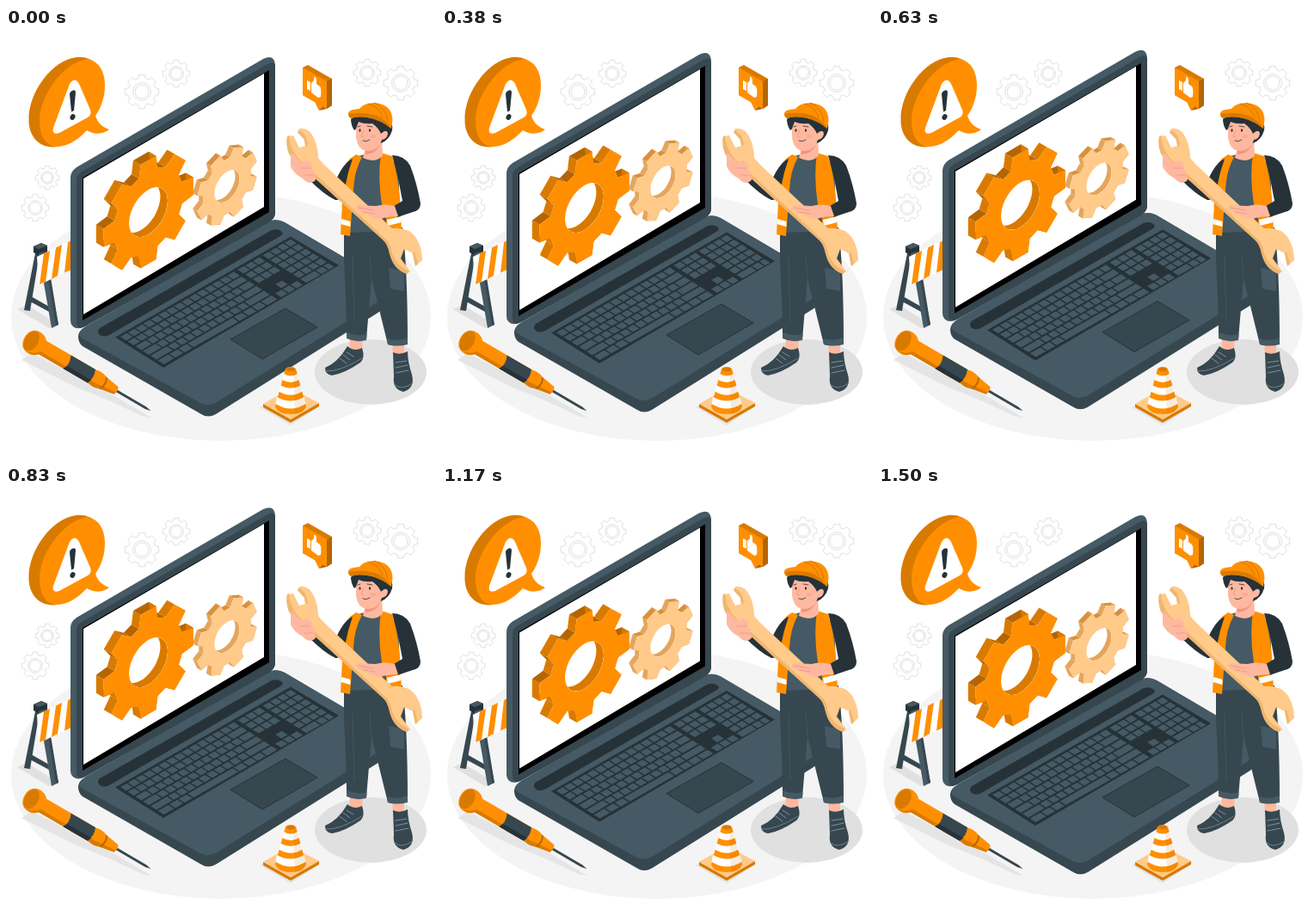
Recreate the animation shown at these times as an HTML page. Size 500 px wide and 500 px high, loop 1540 ms.

```html
<!DOCTYPE html>
<html lang="en">
<head>
<meta charset="utf-8">
<title>Maintenance</title>
<style>
html, body { margin: 0; width: 100%; height: 100%; overflow: hidden; background: #fff; }
svg { display: block; width: 100%; height: 100%; }
.o { fill: #ff8f00; } .od { fill: #d97a00; } .ob { fill: #b56500; }
.g { fill: #455a64; } .gm { fill: #37474f; } .gd { fill: #263238; }
.w { fill: #fff; } .s { fill: #ffb8a0; } .sd { fill: #ee9580; }
.y { fill: #ffca8a; } .yd { fill: #f0b56f; } .sh { fill: #e0e0e0; }
.l { fill: none; stroke-width: .8; stroke-linecap: round; }
</style>
</head>
<body>
<svg viewBox="0 0 500 500" xmlns="http://www.w3.org/2000/svg">
<ellipse cx="250" cy="335.500" rx="244" ry="144.500" fill="#f4f4f4"/>
<g id="cogs" fill="none" stroke="#e0e0e0" stroke-width="1"></g>

<!-- warning bubble -->
<path class="od" d="M26.500 106C26 76 53 37 82 34Q91 33 99 37L104 100L60 138C41 141 26 128 26.500 106Z"/>
<path class="o" d="M39 108C39 79 66 40 95 36C109 39 115 52 115 66C115 80 111 92 104 102C107 111 112 115 120 118C113 124 102 124 94 119C83 131 71 138 58 138C46 137 39 125 39 108Z"/>
<path class="w" d="M74 65Q80 56 85 65L98 95Q100 101 95 104L62 122Q53 125 55 116Z"/>
<path class="gd" d="M74 77Q74 74 78 72.500Q81 71.500 81 75L79 96L76 97.500Z"/>
<ellipse class="gd" cx="77.500" cy="103.500" rx="2.800" ry="3.600" transform="rotate(25 77.500 103.500)"/>

<!-- like tag -->
<path class="od" d="M345 46L351 43L379 59V90L373 94L345 78Z"/>
<path class="o" d="M345 46L373 62V94L368 91L364 96L359 86L345 78Z"/>
<path class="ob" d="M373 62L379 59V90L373 94L364 96L368 91L373 94Z"/>
<path class="w" d="M350 61L354 63V73L350 71ZM355 64L358 61V57Q360 56 361 60V65L365 68Q367 70 366 80L363 81L355 75Z"/>

<!-- barrier -->
<path class="sh" d="M13 327L24 322L60 344L50 349Z"/>
<path class="gm" d="M34 262L39 262L28 329L21 328ZM29 312L52 325V331L28 318Z"/>
<path class="gd" d="M32 254L41 250L48 253V261L38 264L32 261Z"/>
<path class="g" d="M32 254L41 250L48 253L38 257Z"/>
<path class="g" d="M38 262L44 260L61 345L53 349Z"/>
<path class="gm" d="M44 260L47 260L61 345L58 346Z"/>
<path class="w" d="M36 266L78 246V280L38 299Z"/>
<path class="o" d="M44 262L51 259L46 295L39 298ZM58 255.500L65 252L60 288L53 292ZM72 249L78 246V280L68 284.500Z"/>

<!-- screwdriver -->
<path class="sh" d="M18 386L30 378L130 430L169 453L160 452L122 434L80 417Z" opacity=".75"/>
<g transform="translate(33 366) rotate(30.300)">
  <path d="M108-1.300H150L157 0L150 1.600H108Z" fill="#37474f"/>
  <path class="o" d="M-13 0C-13-17 5-17 11-9H78Q85-11 92-8L110-5Q113 0 110 5L92 8Q85 11 78 9H11C5 17-13 17-13 0Z"/>
  <path class="od" d="M11 5H78L110 2V5L92 8Q85 11 78 9H11C8 13 2 14-2 13Q8 11 11 5Z"/>
  <ellipse class="od" cx="-4" cy="0" rx="8" ry="12.500"/>
  <path class="gm" d="M44-9Q49 0 44 9H77Q81 0 77-9Z"/>
  <path class="gd" d="M47 4H79Q78 7 77 9H44Z"/>
  <path class="ob" d="M92-8Q96 0 92 8L94 7.500Q98 0 94-7.500Z"/>
</g>

<g id="laptop">
  <path class="gm" d="M84 359Q84 352 93 347L302 227Q313 220 324 226L431 289Q438 293 438 301V322Q438 328 431 332L244 449Q235 454 227 449L89 370Q84 366 84 359Z"/>
  <path class="g" d="M85 357Q86 352 93 347L302 227Q313 220 324 226L431 289Q438 293 438 301V311Q438 315 432 319L245 435Q235 441 226 436L89 361Q86 359 85 357Z"/>
  <path class="gd" d="M109 349L309 235Q315 233 320 236Q324 239 319 242L120 357Q114 360 109 357Q105 353 109 349Z"/>
  <path class="gd" d="M127 359.500L331 242.500L387 276L183 395Z"/>
  <g id="keys" class="g"></g>
  <path class="gm" d="M261 362L325 326L362 348L298 385Z" stroke="#263238"/>
  <path class="g" d="M75 174Q75 167 82 162L299 36Q312 30 313 43V215Q313 221 306 226L92 347Q82 352 77 346Q75 344 75 340Z"/>
  <path class="gm" d="M82 176Q82 171 88 167L304 42Q313 37 313 46V215Q313 221 306 226L92 347Q82 352 82 342Z"/>
  <path d="M89 174L306 49V214L89 340Z" fill="#000"/>
  <path class="w" d="M90 175L300 53V208L90 333Z"/>
  <g id="gears"></g>
</g>

<!-- cone -->
<path class="sh" d="M295 441L330 421L366 439L331 462Z" opacity=".7"/>
<path class="od" d="M299 437L331 455L364 436V440L331 459L299 441Z"/>
<path class="y" d="M299 437L331 419L364 436L331 455Z"/>
<path class="o" d="M324.500 398Q325 394 331 394T337.500 398L349 440Q346 449 331 449T313 440Z"/>
<path class="w" d="M323 402Q331 407 339 402L341 409Q331 415 321 409ZM319 415.500Q331 422 343 415.500L345 422.500Q331 431 317 422.500ZM315 429Q331 438 346.500 429L348.500 437Q331 448 313.500 437Z"/>
<path class="ob" d="M334 395L337.500 398L349 440Q346 448 336 449Z" opacity=".13"/>
<ellipse class="od" cx="331" cy="397" rx="5" ry="2.300"/>

<!-- worker -->
<ellipse class="sh" cx="424" cy="400" rx="65" ry="38"/>
<path class="s" d="M400 358H415L414 378L399 377ZM449 364H463V381H450Z"/>
<path class="gm" d="M397 370Q405 377 414 372Q418 384 412 389Q393 402 379 404Q371 403 371 395Q386 389 397 370ZM450 377Q458 381 467 376Q467 388 472 403Q476 419 462 423Q449 420 451 405Z"/>
<path class="l" d="M372 399Q388 400 414 384M452 415Q460 422 473 413" stroke="#78909c"/>
<path class="l" d="M388 384L396 390M392 380L400 386M396 377L404 382M453 389L466 387M453 395L467 392M453 401L468 398" stroke="#90a4ae"/>
<path class="gm" d="M393 234L461 232Q467 280 467 367Q455 371 444 368L425 291L419 362Q407 366 396 360Q396 325 393 272Z"/>
<path class="g" d="M396 354Q408 359 419.500 356L419 363Q407 366 396 361ZM443 361Q455 365 467 360V368Q455 371 444 368ZM445 279L463 283V306L447 303Z"/>
<path class="l" d="M425 291L423 266M403 265L405 342" stroke="#455a64"/>
<path class="g" d="M408 150Q423 143 440 148L456 160L459 236L393 238L396 180Z"/>
<path class="o" d="M407 147L414 150Q405 166 404 188L400 242L389 240L392 183Q390 163 400 152ZM436 145L449 149Q456 170 458 202L460 235L441 240Q445 222 437 205Q432 174 436 145Z"/>
<path class="w" d="M390 222L400.500 225V231L389.500 228ZM443 223L459.500 219V226L444 230Z"/>
<path class="gd" d="M403 152Q393 156 384 176L359 165L352 176Q370 194 383 200Q390 201 393 190L398 168Z"/>
<path class="y" d="M341 117Q352 115 358 128Q363 139 363 151L369 158L449 233Q468 231 477 244Q484 256 484 270L476 277L473 262L463 257L459 268L470 283L466 286Q450 280 446 262Q444 252 439 247L352 168Q336 159 329 146Q325 136 327 126L334 125L341 139L348 137L347 130L339 121Z"/>
<path class="yd" d="M327 126L329 125Q330 146 351 162L441 245Q447 250 449 262Q454 277 469 283L466 286Q450 280 446 262Q444 252 439 247L352 168Q336 159 329 146Q325 136 327 126ZM473 262L475 260L479 274L476 277ZM339 121L341 119Q349 122 351 136L348 137L347 130Z"/>
<path class="s" d="M331 147Q335 146 338 152L344 157Q350 152 354 156Q358 160 355 164Q361 167 358 172Q363 176 357 179Q351 182 345 175Q335 170 331 161Z"/>
<path class="l" d="M343 163L354 163M347 171L357 171" stroke="#ee9580"/>
<path class="gd" d="M449 148Q463 148 470 160Q478 181 482 204Q482 212 473 214L455 220L451 207L461 201L455 170Z"/>
<path class="s" d="M452 207L456 219Q443 219 436 222Q427 222 421 217L409 212Q405 209 409 206L430 207Q441 204 452 207Z"/>
<path class="l" d="M410 209L427 212M415 214L429 216" stroke="#ee9580"/>
<path class="s" d="M415 132L437 126L438 148Q430 158 415 151L417 142Z"/>
<path class="sd" d="M418 142L435 135Q431 146 418 147Z"/>
<path class="gd" d="M401 106Q407 99 441 103Q451 110 449 119Q446 130 436 134L410 115L405 119Q401 113 401 106Z"/>
<path class="s" d="M407 109Q419 104 434 111Q437 117 437 122Q443 117 444 123Q443 129 437 130Q433 143 420 143Q409 142 407 127Z"/>
<path class="gd" d="M404 106Q422 103 441 109L440 118L436 123Q433 116 426 111Q416 112 410 109L407 117Z"/>
<ellipse class="gd" cx="411.500" cy="119" rx="1.100" ry="1.700"/>
<ellipse class="gd" cx="423" cy="119" rx="1.100" ry="1.700"/>
<path class="l" d="M409 115L412 114M420 114L426 115M415 131Q419 133 423 130" stroke="#263238"/>
<path class="l" d="M416 119L413 126L416 127" stroke="#ee9580"/>
<ellipse class="sd" cx="427" cy="126" rx="3" ry="2" opacity=".4"/>
<path class="o" d="M398 100Q397 95 411 94Q416 87 429 87Q449 89 449.500 107L448 117Q437 107 420 104Q408 102 401 105Q398 103 398 100Z"/>
<path class="od" d="M398 100Q413 97 429 101Q441 105 448 117Q437 107 420 104Q408 102 401 105Q398 103 398 100Z"/>
<path class="l" d="M421 88Q434 91 438 104M428 87Q442 92 444 109" stroke="#c87000"/>
</svg>

<script>
const $ = id => document.getElementById(id);
const pts = list => list.map(p => p.map(n => n.toFixed(1)).join(",")).join(" ");
const poly = (list, fill) => `<polygon points="${pts(list)}"${fill ? ` fill="${fill}"` : ""}/>`;

// Corner points of an eight-toothed wheel, as [x, y]
function wheel(tip, root, turn = 0) {
  const out = [];
  for (let i = 0; i < 8; i++) {
    [[-.27, root], [-.17, tip], [.17, tip], [.27, root]].forEach(([d, r]) => {
      const a = (i + turn) * Math.PI / 4 + d;
      out.push([r * Math.cos(a), r * Math.sin(a)]);
    });
  }
  return out;
}

// Solid gear standing in the plane of the screen
function gear(cx, cy, tip, root, turn, hole, depth, face, left, top) {
  const iso = ([x, y]) => [cx + x * .866, cy + y - x * .5];
  const back = ([x, y]) => [x - depth * .866, y - depth * .5];
  const rim = wheel(tip, root, turn).map(iso);
  const ring = Array.from({ length: 48 }, (_, i) =>
    iso([hole * Math.cos(i * Math.PI / 24), hole * Math.sin(i * Math.PI / 24)]));
  const path = list => "M" + pts(list) + "Z";
  const sides = rim.map((p, i) => {
    const q = rim[(i + 1) % rim.length];
    const flat = Math.abs(q[0] - p[0]) > Math.abs(q[1] - p[1]) * .8;
    return poly([p, q, back(q), back(p)], flat ? top : left);
  }).join("");
  const id = "hole" + cx;
  return `${sides}<clipPath id="${id}"><path d="${path(ring)}"/></clipPath>
    <g clip-path="url(#${id})">${poly(ring, left)}${poly(ring.map(back), "#fff")}</g>
    <path fill="${face}" fill-rule="evenodd" d="${path(rim)}${path(ring)}"/>`;
}

$("gears").innerHTML =
  gear(257, 184, 41, 32, .5, 17, 6, "#ffca8a", "#e5a55c", "#d9903c") +
  gear(165.5, 214, 61, 47, 0, 26, 10, "#ff8f00", "#d97a00", "#b56500");

$("cogs").innerHTML = [
  [158, 74, 20], [198, 53, 16], [420, 52, 16], [459, 64, 20], [48, 174, 14], [34, 209, 16]
].map(([x, y, r]) => `<g transform="translate(${x} ${y})">${poly(wheel(r, r * .8))}
  <circle r="${r * .52}"/><circle r="${r * .4}"/></g>`).join("");

// Keyboard: u runs along a row, v from the back row to the front one
const spot = (u, v) => [128.5 + 202 * u + 54 * v, 359.5 - 115.5 * u + 34 * v];
function key(u, v, w, h) {
  const a = u + .0035, b = u + w - .0035, c = v + .017, d = v + h - .017;
  return poly([spot(a, c), spot(b, c), spot(b, d), spot(a, d)]);
}
function row(u, v, widths, h) {
  const unit = .66 / 15;
  return widths.map(n => { const k = key(u, v, n * unit, h); u += n * unit; return k; }).join("");
}
const many = (n, w = 1) => Array(n).fill(w);
const h = .162;
const rows = [
  many(15), [...many(13), 2], [1.5, ...many(12), 1.5],
  [1.8, ...many(11), 2.2], [2.3, ...many(10), 2.7], [1.5, 1.2, 1.2, 6, 1.2, 1.2, 1.2, 1.5]
];
let keys = "";
rows.forEach((r, i) => {
  const v = .015 + i * h;
  keys += row(.01, v, r, h);
  if (i < 3 || i === 5) keys += row(.685, v, many(3), h);
  if (i === 4) keys += row(.729, v, [1], h);
  keys += row(.83, v, i === 5 ? [2, 1, .8] : many(4, .95), h);
});
$("keys").innerHTML = keys;

// The laptop rises 10 px and sinks back at even speed, 24 steps a second
const LOOP = 1540, REST = 36;
let start;
function draw(now) {
  start ??= now;
  const step = Math.min(REST, Math.floor(((now - start) % LOOP + 4) * .024));
  const y = -10 * (1 - Math.abs(1 - 2 * step / REST));
  $("laptop").setAttribute("transform", `translate(0 ${y.toFixed(2)})`);
  requestAnimationFrame(draw);
}
requestAnimationFrame(draw);
</script>
</body>
</html>
```
